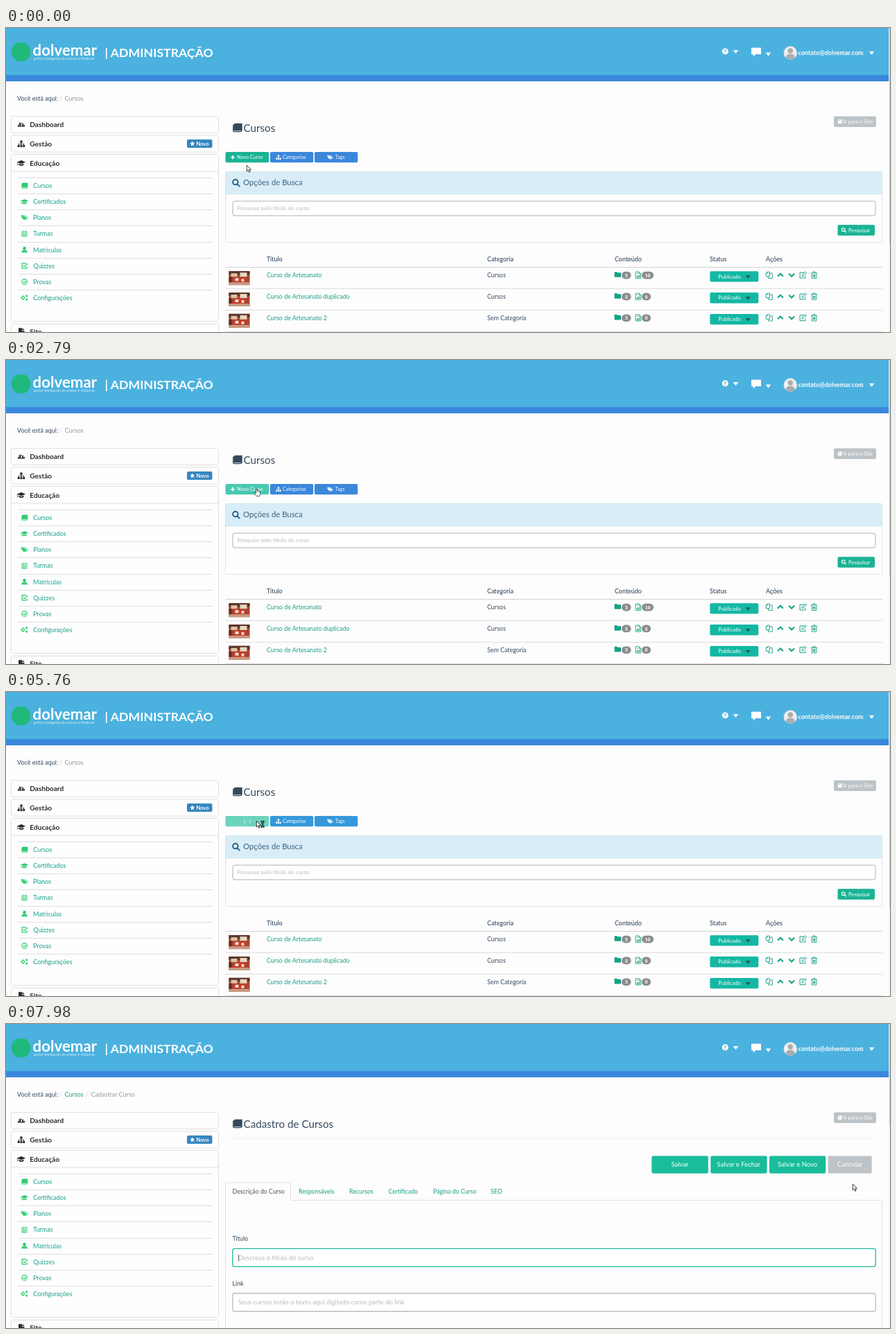
An HTML page for the animation above (8000 ms loop, 1275 by 439 pixels).

```html
<!DOCTYPE html>
<html lang="pt-BR">
<head>
<meta charset="utf-8">
<title>Administração de cursos</title>
<style>
html, body { margin: 0; width: 100%; height: 100%; overflow: hidden; background: #fdfdfd; }
svg { display: block; font-family: Lato, sans-serif; }
</style>
</head>
<body>
<svg id="stage" width="1275" height="439" viewBox="0 0 1275 439"></svg>
<script>
const INK = '#34495e', GREEN = '#16a085', TEAL = '#1ab394', BLUE = '#3a87dc', GRAY = '#bdc3c7', LINE = '#e0e0e0';

const text = (x, y, s, size = 8.95, fill = INK, weight = 400, more = '') =>
  `<text x="${x}" y="${y}" font-size="${size}" fill="${fill}" font-weight="${weight}" ${more}>${s}</text>`;
const mid = 'text-anchor="middle"';
const rect = (x, y, w, h, fill, stroke = 'none', rx = 2, more = '') =>
  `<rect x="${x}" y="${y}" width="${w}" height="${h}" rx="${rx}" fill="${fill}" stroke="${stroke}" ${more}/>`;
const rule = (x1, x2, y, color = LINE) => `<path d="M${x1} ${y}H${x2}" stroke="${color}"/>`;
const disc = (x, y, r, fill) => `<circle cx="${x}" cy="${y}" r="${r}" fill="${fill}"/>`;
const caret = (x, y, w, h, fill = '#fff') => `<path d="M${x - w / 2} ${y}h${w}l${-w / 2} ${h}z" fill="${fill}"/>`;

// Icons sit on a 16-unit grid around the origin; a second entry is a stroke width.
const icons = {
  book: ['M-7-4L-4-7H8V5L6 7H-5Q-7 7-7 5ZM-5.5 4.6V5.6H5.5L6.5 4.6Z'],
  gauge: ['M-8 5A8 8 0 1 1 8 5ZM-1.6 3L1-4H2L1.4 3ZM-6 0h2v2h-2zM-4.5-4h2v2h-2zM4 0h2v2h-2z'],
  tree: ['M-2.5-7h5v5h-5zM-8 3h4.5v4.5h-4.5zM-2.2 3h4.5v4.5h-4.5zM3.5 3h4.5v4.5h-4.5zM-6.4 3V0H-.7V-2H.7V0H6.4V3H5V1.3H.7V3H-.7V1.3H-5V3Z'],
  cap: ['M-9.5-2L0-6 9.5-2 0 2ZM-5.3 1.2L0 3.5 5.3 1.2V4.5Q0 7.5-5.3 4.5ZM-8.6-1h1.2v6.5h-1.2z'],
  tags: ['M-8-6H-2.5L4.5 1-.5 6-8-1ZM-6-4v2h2v-2zM0-6H2L8.5 1 3.5 6 2 5 6 1Z'],
  calendar: ['M-6-5H6V7H-6ZM-6-1.5H6M-6 2.7H6M-2 -1V7M2-1V7M-3-7.5V-4M3-7.5V-4', 1.4],
  user: ['M0-7.5a3.8 4.5 0 0 1 0 9a3.8 4.5 0 0 1 0-9M-7.5 7Q-7.5 2.5-3 1.2Q0 3.4 3 1.2Q7.5 2.5 7.5 7Z'],
  checkBox: ['M4-6H-6V6H6V2M-3.5-1L-.2 2.3 7.5-5.5', 2],
  checkRing: ['M6.3 0A6.3 6.3 0 1 1-6.3 0A6.3 6.3 0 1 1 6.3 0M-3.2-.2L-.5 2.4 3.5-2.2', 2],
  cogs: ['M0 0A3.2 3.2 0 1 1-6.4 0A3.2 3.2 0 1 1 0 0M7-4.5A1.7 1.7 0 1 1 3.6-4.5A1.7 1.7 0 1 1 7-4.5M7 4.5A1.7 1.7 0 1 1 3.6 4.5A1.7 1.7 0 1 1 7 4.5M-3.2-5.8V-3.5M-3.2 3.5V5.8M-9 0H-7', 2.1],
  star: ['M0-8L2.4-2.8 8-2.2 3.8 1.6 5 7.2 0 4.3-5 7.2-3.8 1.6-8-2.2-2.4-2.8Z'],
  plus: ['M-2-7H2V-2H7V2H2V7H-2V2H-7V-2H-2Z'],
  search: ['M3.5-1.5A5 5 0 1 1-6.5-1.5A5 5 0 1 1 3.5-1.5M2.2 2.2L7 7', 2.6],
  globe: ['M7.5 0A7.5 7.5 0 1 1-7.5 0A7.5 7.5 0 1 1 7.5 0M-4-4L0-5 1-2-2 0ZM1 1L5 0 3 5Z'],
  folder: ['M-8-5Q-8-6.5-6.5-6.5H-2.5L-.5-4.5H6.5Q8-4.5 8-3V5Q8 6.5 6.5 6.5H-6.5Q-8 6.5-8 5Z'],
  file: ['M-6-7.3H2L6-3.3V7.3H-6ZM2-7V-3H6M-3 4.6L-1 1 1 3 3 0V4.6ZM-3-3H-1', 1.5],
  copy: ['M-7-4L-4-7H1V3H-7ZM1-2L3-4H7V7H-2V3M-4-7V-4H-7', 1.4],
  up: ['M-6 3L0-3 6 3', 3.2],
  down: ['M-6-3L0 3 6-3', 3.2],
  edit: ['M3-5.5H-6.5V6.5H5.5V2M-2 2.5L-1.5-.5 5.5-7.5 8-5 1 2Z', 1.5],
  trash: ['M-5-4V7H5V-4M-7-4.5H7M-2.5-5V-7.2H2.5V-5M-2-1.5V4.5M0-1.5V4.5M2-1.5V4.5', 1.4],
  page: ['M-6-8H2V-2H7V8H-6ZM3-8L7-3.5H3Z'],
  bubble: ['M-8-7H8V4H-1L-5 8V4H-8Z']
};
const icon = (name, x, y, size, color) => {
  const [d, w] = icons[name];
  const paint = w ? `fill="none" stroke="${color}" stroke-width="${w}"` : `fill="${color}" fill-rule="evenodd"`;
  return `<path transform="translate(${x} ${y}) scale(${size / 16})" d="${d}" ${paint}/>`;
};

function header() {
  return rect(0, 0, 1273.5, 68, '#4bb1df', 'none', 0) + rect(0, 68, 1273.5, 9, BLUE, 'none', 0) +
    disc(21.5, 34.5, 14, '#1fb97c') +
    text(38.5, 40, 'dolvemar', 22.3, '#fff', 700) +
    text(39.5, 45.5, 'gestor inteligente de ensino à distância', 5.2, '#d3ecf7') +
    text(142.5, 42, '| ADMINISTRAÇÃO', 17.7, '#fff', 700) +
    disc(1037.3, 33.7, 4.5, '#fff') + text(1037.3, 36.6, '?', 8, '#4bb1df', 900, mid) +
    caret(1052.5, 32, 7.5, 5) + icon('bubble', 1082, 34.5, 14, '#fff') + caret(1099.5, 35.5, 7.5, 5) +
    disc(1131.3, 36, 9.7, '#eceeef') + disc(1131.3, 33, 3.7, '#a9adb0') +
    '<path d="M1124.6 42.6Q1125.5 37.6 1131.3 37.6T1138 42.6Q1131.3 48.8 1124.6 42.6Z" fill="#a9adb0"/>' +
    text(1142.7, 38.7, 'contato@dolvemar.com', 8.95, '#fff', 700) + caret(1248.5, 33.8, 7.5, 5);
}

function sidebar() {
  const box = (y, h) => rect(7.5, y, 299, h, '#fefefe', LINE, 3);
  const head = (y, name, label) => icon(name, 22, y - 3.5, 10.5, '#2b2b2b') + text(34.3, y, label, 10.15, '#2b2b2b', 700);
  const items = [['book', 'Cursos'], ['cap', 'Certificados'], ['tags', 'Planos'], ['calendar', 'Turmas'],
    ['user', 'Matrículas'], ['checkBox', 'Quizzes'], ['checkRing', 'Provas'], ['cogs', 'Configurações']];
  return box(127.5, 24) + box(155, 24) + box(182.5, 241) + box(427.5, 30) + rule(8, 306, 207) +
    head(142.7, 'gauge', 'Dashboard') + head(170.5, 'tree', 'Gestão') +
    head(198.5, 'cap', 'Educação') + head(442, 'page', 'Site') +
    rect(261, 161, 36.5, 12, '#3787c0') + icon('star', 268.8, 167, 7, '#fff') + text(274.5, 169.7, 'Novo', 7.5, '#fff', 700) +
    items.map(([name, label], i) => {
      const y = 227.6 + 23.13 * i;
      return rule(17, 298, Math.round(y - 11.5) + .5, '#dedede') + icon(name, 26.6, y, 9.5, '#2ecc71') + text(39.3, y + 3.4, label, 8.95, GREEN);
    }).join('');
}

function shared() {
  return text(16, 105, 'Você está aqui:') + text(77, 105, '/', 8.95, '#ccc') +
    icon('book', 333.5, 144, 14.5, INK) +
    rect(1194, 127.5, 61, 15.5, GRAY) + icon('globe', 1203, 135.2, 7, '#fff') + text(1208, 138, 'Ir para o Site', 7.6, '#fff');
}

function thumb(y) {
  return `<g transform="translate(321.5 ${y})">` + rect(0, 0, 30, 20, '#a8442f', 'none', 0) +
    rect(0, 0, 30, 5, '#5a3427', 'none', 0) + rect(3, 3, 9, 5, '#d9c4a2', 'none', 0) + rect(16, 2, 10, 6, '#e6d8c2', 'none', 0) +
    rect(6, 9, 18, 7, '#c9392b', 'none', 0) + rect(9, 10, 5, 4, '#f0e2d0', 'none', 0) + rect(18, 11, 4, 4, '#eed9c4', 'none', 0) +
    rect(0, 16, 30, 4, '#c69a84', 'none', 0) + rect(0, 8, 4, 8, '#632a20', 'none', 0) + '</g>';
}

function listPage() {
  const small = (x, y, s) => text(x, y, s, 7.25, '#fff');
  const badge = (x, y, w, n) => rect(x, y - 5.3, w, 10.6, '#8c8c8c', 'none', 5.3) +
    text(x + w / 2, y + 2.7, n, 7.2, '#fff', 700, mid + ' font-family="Noto Serif, serif"');
  const rows = [['Curso de Artesanato', 'Cursos', 10], ['Curso de Artesanato duplicado', 'Cursos', 8], ['Curso de Artesanato 2', 'Sem Categoria', 8]];
  const columns = [[376, 'Título'], [694, 'Categoria'], [878, 'Conteúdo'], [1015, 'Status'], [1096, 'Ações']];
  return text(84.7, 105, 'Cursos', 8.95, '#999') + text(342.5, 149.8, 'Cursos', 15.2) +
    rect(316.5, 179, 62.7, 15.3, TEAL, 'none', 2, 'id="create"') +
    '<g id="createLabel">' + icon('plus', 327, 186.7, 6.5, '#fff') + small(333, 189.3, 'Novo Curso') + '</g>' +
    rect(381, 179, 62.3, 15.3, BLUE, 'none', 2, 'class="link"') + icon('tree', 393, 186.5, 7.5, '#fff') + small(399, 189.3, 'Categorias') +
    rect(445, 179, 62.3, 15.3, BLUE, 'none', 2, 'class="link"') + icon('tags', 467.5, 186.7, 8, '#fff') + small(474.7, 189.3, 'Tags') +
    '<path id="spinner" d="M-3-3A4.2 4.2 0 0 0-3 3M3-3A4.2 4.2 0 0 1 3 3" fill="none" stroke="#fff" stroke-width=".9"/>' +
    rect(316.5, 207.5, 947, 102, '#fefefe', '#dfe6ea') + rect(316.5, 207.5, 947, 32.5, '#d9edf8', '#cfe5ef') +
    icon('search', 332, 223.7, 12, '#2f6488') + text(342, 227.3, 'Opções de Busca', 11.35, '#3a627e') +
    rect(327, 250, 927, 21, '#fff', '#aeb1b3', 3) + text(333.5, 263, 'Pesquise pelo título do curso', 8.25, '#b4bbc1') +
    rect(1199.5, 284.3, 53.5, 15.5, TEAL) + icon('search', 1208.5, 292, 7.5, '#fff') + text(1215, 294.8, 'Pesquisar', 7.55, '#fff') +
    columns.map(([x, s]) => text(x, 336.7, s, 8.95, INK, 500)).join('') + rule(316.5, 1264, 345.5, '#d2d2d2') +
    rows.map(([title, category, n], i) => {
      const y = 356.8 + 30.8 * i;
      return thumb(y - 5.6) + text(376, y + 3.3, title, 8.9, GREEN) + text(694, y + 3.3, category, 8.9) +
        icon('folder', 882.3, y - .8, 9.5, GREEN) + badge(888, y + .3, 13.5, 3) +
        icon('file', 911.8, y, 10, GREEN) + badge(917, y + .3, n > 9 ? 17 : 13, n) +
        rect(1015.3, y - 5.5, 70, 15.3, '#13b8a4') + text(1027.3, y + 4.7, 'Publicado', 7.6, '#fff') + caret(1070, y + .5, 7.5, 4.7, '#245b60') +
        ['copy', 'up', 'down', 'edit', 'trash'].map((k, j) => icon(k, 1100.7 + 16.2 * j, y, 10.5, GREEN)).join('') +
        rule(316.5, 1264, Math.round(y + 19.5) + .5, '#dedede');
    }).join('');
}

function formPage() {
  const button = (x, w, s, fill) => rect(x, 190.5, w, 25.3, fill) + text(x + w / 2, 206.3, s, 9.5, '#fff', 400, mid);
  const tabs = [[422, 'Responsáveis'], [495, 'Recursos'], [551.5, 'Certificado'], [616, 'Página do Curso'], [699, 'SEO']];
  const field = (y, label, hint, id) => text(326.5, y - 11, label, 9) +
    rect(326.8, y + .3, 927.4, 26, '#fff', '#b9bdc1', 3, `stroke-width="1.3" id="${id}"`) + text(335, y + 16.7, hint, 9.45, '#b4bbc1');
  return text(84.7, 105, 'Cursos', 8.95, GREEN) + text(115, 105, '/', 8.95, '#ccc') + text(122.7, 105, 'Cadastrar Curso', 8.95, '#999') +
    text(342.5, 149.8, 'Cadastro de Cursos', 15.2) + rule(327, 1255, 165.5, '#eee') +
    button(931.3, 81.5, 'Salvar', '#1abc9c') + button(1016.3, 81.3, 'Salvar e Fechar', '#1abc9c') +
    button(1101, 81.3, 'Salvar e Novo', '#1abc9c') + button(1185.7, 63, 'Cancelar', GRAY) +
    `<path d="M316.5 439V231.5Q316.5 229 319 229H408Q410.5 229 410.5 231.5V254.5H1263.5V439" fill="none" stroke="${LINE}"/>` +
    text(326.5, 244.5, 'Descrição do Curso', 8.8, '#555') + tabs.map(([x, s]) => text(x, 244.5, s, 8.8, GREEN)).join('') +
    field(324, 'Título', 'Descreva o título do curso', 'titleField') +
    field(388.7, 'Link', 'Seus cursos terão o texto aqui digitado como parte do link', 'linkField') +
    '<path id="textCaret" d="M335.4 333V343" stroke="#444" stroke-width=".7"/>';
}

const ARROW = '<path d="M.3.3V9L2.3 7.2 3.7 10.4 5.1 9.8 3.7 6.7H6.5Z" fill="#fff" stroke="#111" stroke-width=".8"/>';
const pointers = {
  none: '',
  arrow: ARROW,
  busy: ARROW + '<path d="M6.6.5H11.6M6.6 9.2H11.6M7.3.5V2.5L10.9 7V9.2M10.9.5V2.5L7.3 7V9.2" fill="none" stroke="#111" stroke-width="1"/><path d="M8 2H10.2L9.1 4ZM8 8.6L9.1 6.8 10.2 8.6Z" fill="#111"/>',
  hand: '<path d="M2.6.9Q3.5-.1 4.3.9V4.2Q5.5 3.7 6 4.7Q7 4.2 7.4 5.1Q8.7 4.8 8.7 6.2V8.6L7.7 11.6H3.3L.6 7.6Q.3 6 1.6 6.5L2.6 7.4Z" fill="#fff" stroke="#111" stroke-width=".7"/>',
  beam: '<path d="M0 0H1.5L2 .5 2.5 0H4M2 .5V10.5M0 11H1.5L2 10.5 2.5 11H4" fill="none" stroke="#333" stroke-width=".8"/>'
};

// Each step holds from its time until the next one.
const pointerSteps = [
  [0, 'arrow', 347, 198], [150, 'hand', 358, 191], [470, 'hand', 358, 186], [600, 'hand', 358, 177.5],
  [720, 'hand', 358, 179], [850, 'hand', 358, 180], [2790, 'hand', 358, 185], [3660, 'arrow', 361, 186],
  [4680, 'busy', 361, 186], [6460, 'arrow', 800, 220], [6830, 'arrow', 1211, 232], [6990, 'none', 0, 0],
  [7290, 'arrow', 1234, 201], [7430, 'arrow', 886, 246], [7710, 'arrow', 890, 290], [7840, 'beam', 893, 327],
  [7980, 'arrow', 1221, 231]
];
const createSteps = [[0, TEAL], [150, '#48c9b0'], [3810, '#6cd3bd']];
const labelSteps = [[0, 1], [3810, .6], [3960, .3], [4120, 0]];
const focusSteps = [[0, '#b9bdc1'], [6460, '#6fbfae'], [6830, '#1abc9c']];
const blinkSteps = [[0, 0], [6830, 1], [7430, 0], [7840, 1]];
const thumbSteps = [[0, 312], [5910, 154], [6460, 146]];
const at = (steps, t) => steps.findLast(s => s[0] <= t).slice(1);

const stage = document.getElementById('stage');
stage.innerHTML = rect(0, 0, 1275, 439, '#fdfdfd', 'none', 0) + header() + sidebar() + shared() +
  `<g id="list">${listPage()}</g><g id="form">${formPage()}</g>` +
  rect(1273.5, 0, 1.5, 439, '#f4f4f4', 'none', 0) + rect(1274, 0, 1, 312, '#c9c9c9', 'none', 0, 'id="thumb"') +
  '<g id="pointer"></g>';
const part = id => document.getElementById(id);
const set = (id, name, value) => part(id).setAttribute(name, value);

function draw(t) {
  const [kind, x, y] = at(pointerSteps, t);
  const step = Math.floor((t - 4120) / (1640 / 12) + 1e-6);
  set('list', 'display', t < 5910 ? 'inline' : 'none');
  set('form', 'display', t < 5910 ? 'none' : 'inline');
  set('create', 'fill', at(createSteps, t));
  set('createLabel', 'opacity', at(labelSteps, t));
  stage.querySelectorAll('.link').forEach(e => e.setAttribute('fill', t < 3810 ? BLUE : '#3498db'));
  set('spinner', 'opacity', t < 3960 ? 0 : .85);
  set('spinner', 'transform', `translate(348 187) rotate(${step * 140 / 3 - 20})`);
  set('titleField', 'stroke', at(focusSteps, t));
  set('textCaret', 'opacity', at(blinkSteps, t));
  set('thumb', 'height', at(thumbSteps, t));
  part('pointer').innerHTML = pointers[kind];
  set('pointer', 'transform', `translate(${x} ${y})`);
}

const start = performance.now();
function frame() {
  draw((performance.now() - start) % 8000);
  requestAnimationFrame(frame);
}
frame();
</script>
</body>
</html>
```
